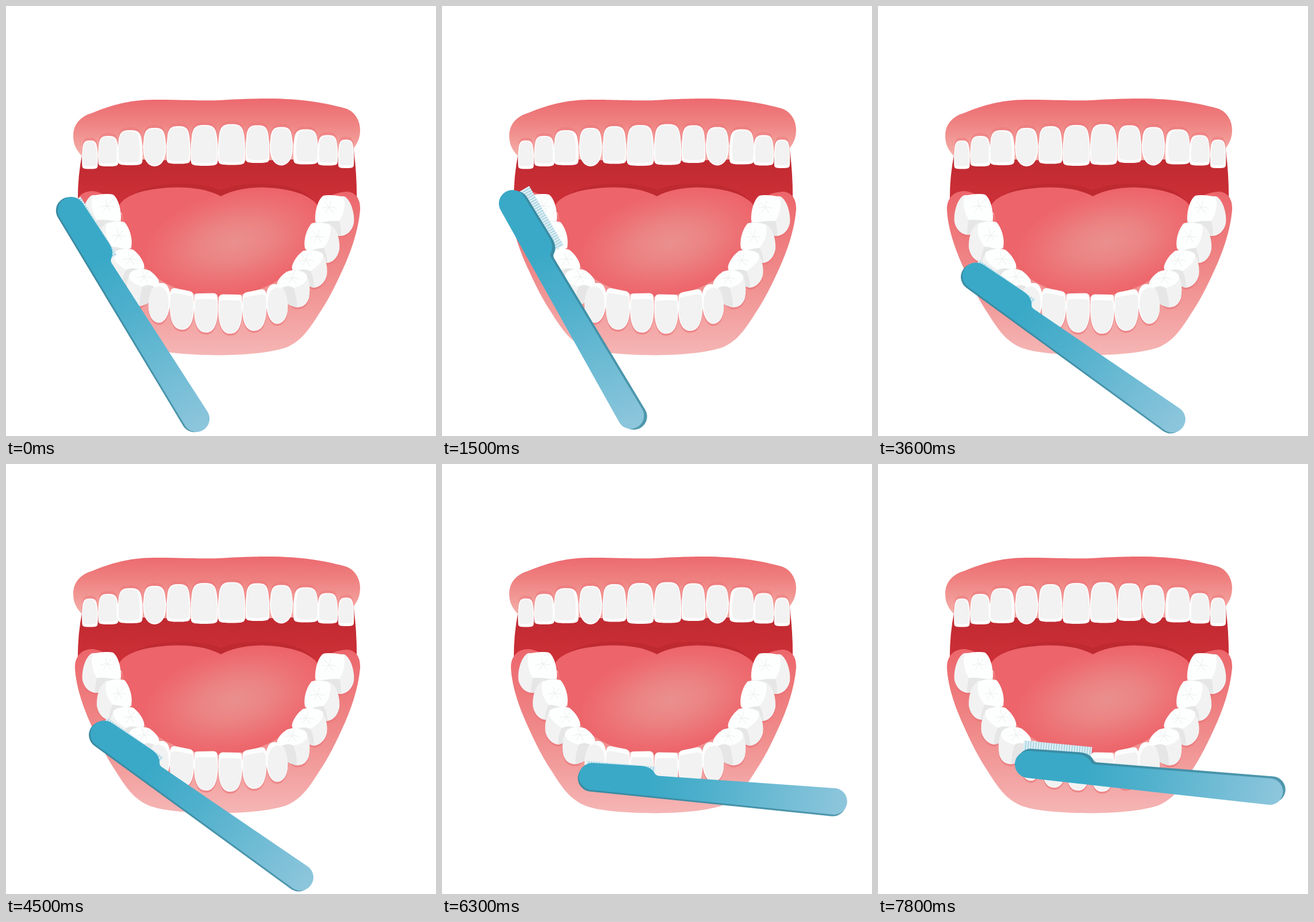
An HTML page that plays this animation: 748x748 px, repeating every 8100 ms.

```html
<!DOCTYPE html>
<html lang="en">
<head>
<meta charset="utf-8">
<title>Brushing teeth</title>
<style>
html, body { margin: 0; width: 100%; height: 100%; overflow: hidden; background: #fff; }
svg { display: block; width: 100vw; height: 100vh; }
.white { fill: #fdfefe; }
.body { fill: #f2f2f2; }
.shade { fill: #e6e6e6; }
.crack { fill: none; stroke: #edf0f0; stroke-width: 1.1; stroke-linecap: round; }
.halo { fill: #ea7277; opacity: .6; }
.soft { fill: #ea7277; opacity: .4; }
</style>
</head>
<body>
<svg viewBox="0 0 748 748">
  <defs>
    <linearGradient id="upperGum" gradientUnits="userSpaceOnUse" x1="0" y1="162" x2="0" y2="255">
      <stop offset="0" stop-color="#ec6a6f"/><stop offset=".45" stop-color="#ef8382"/><stop offset="1" stop-color="#f4aaa5"/>
    </linearGradient>
    <linearGradient id="lowerGum" gradientUnits="userSpaceOnUse" x1="0" y1="322" x2="0" y2="608">
      <stop offset="0" stop-color="#ec666b"/><stop offset=".5" stop-color="#f08a8a"/><stop offset="1" stop-color="#f5b6b5"/>
    </linearGradient>
    <linearGradient id="throat" gradientUnits="userSpaceOnUse" x1="0" y1="260" x2="0" y2="345">
      <stop offset="0" stop-color="#bf2930"/><stop offset="1" stop-color="#ce3038"/>
    </linearGradient>
    <radialGradient id="tongue" gradientUnits="userSpaceOnUse" cx="0" cy="0" r="1" gradientTransform="translate(398 411) rotate(-12) scale(165 90)">
      <stop offset="0" stop-color="#ea8f8e"/><stop offset=".35" stop-color="#eb8584"/><stop offset=".75" stop-color="#ed6f73"/><stop offset="1" stop-color="#ed646a"/>
    </radialGradient>
    <linearGradient id="face" gradientUnits="userSpaceOnUse" x1="100" y1="-10" x2="440" y2="20">
      <stop offset="0" stop-color="#3aa9c7"/><stop offset=".3" stop-color="#4fb0cc"/><stop offset="1" stop-color="#8dc6dc"/>
    </linearGradient>
    <linearGradient id="side" gradientUnits="userSpaceOnUse" x1="100" y1="0" x2="440" y2="0">
      <stop offset="0" stop-color="#3a8ca4"/><stop offset="1" stop-color="#4f98ae"/>
    </linearGradient>
    <path id="handle" d="M-1-23.500L83-25.500C96-25.500 103-21 107-15Q109.500-11.200 114-11L422-16A23 23 0 0 1 422 30L0 23.500A23.500 23.500 0 0 1-1-23.500Z"/>
    <clipPath id="inUpper"><use href="#upper"/></clipPath>
  </defs>

  <path fill="url(#throat)" d="M133 255Q124 298 125 345L215 362H540L610 345Q611 292 604 244Z"/>
  <path fill="#bf2a31" d="M207 336C237 315 265 309 310 309Q350 310 374 320Q400 309 440 309C485 309 515 317 535 338L374 350Z"/>
  <path id="upper" fill="url(#upperGum)" d="M133 262C122 251 117 240 117 226C117 205 130 192 150 186C185 172 215 163 260 163C310 163 330 165 370 164C420 161 440 161 465 161C520 162 560 170 590 178C607 183 616 200 616 215C616 230 611 240 604 248L603 262Q368 277 133 262Z"/>
  <path fill="url(#lowerGum)" d="M120 356C119 334 132 322 150 322C170 323 185 338 197 352L228 430Q290 495 370 500Q450 495 508 430L543 350C555 332 575 323 595 323C610 325 617 338 616 355C613 390 600 428 585 460C573 487 560 512 546 533C527 563 515 581 490 593C465 602 425 607 370 607.500C320 607 270 604 246 593C221 581 209 563 190 533C176 512 163 487 151 460C136 428 122 390 120 356Z"/>
  <path fill="url(#tongue)" d="M197 347C208 326 250 316 300 315.500C340 316 360 324 374 331C390 322 415 316 445 315.500C500 317 533 331 543 349L524 430Q470 502 370 506Q270 502 222 430Z"/>
  <g id="teeth"></g>

  <g id="brush">
    <path id="base" stroke="#a8d3e1"/>
    <path id="tufts" stroke="#e0f0f5" stroke-dasharray="2.6 1.900"/>
    <use id="edge" href="#handle" fill="url(#side)"/>
    <use href="#handle" fill="url(#face)"/>
  </g>
</svg>
<script>
const $ = id => document.getElementById(id);
const path = (cls, d) => `<path class="${cls}" d="${d}"/>`;
const mirror = (w, dy, art) => art + `<g transform="matrix(-1 0 0 1 ${w} ${dy})">${art}</g>`;

// Upper tooth: flat top with round shoulders, bottom corners of height b
function crown(x0, x1, y0, y1, b) {
  const w = x1 - x0, h = y1 - y0, m = (x0 + x1) / 2, i = w * .015, c = w * b * .012;
  const half = (x, s) => ({
    low: `${x + s * i} ${y1 - b}`,
    side: `${x - s * i} ${y0 + h * .55}`,
    shoulder: `${x + s * w * .04} ${y0 + h * .3}`,
    bend: `${x + s * w * .08} ${y0 + h * .02}`,
    top: `${x + s * w * .25} ${y0}`,
    corner: `${x + s * i} ${y1 - b * .1}`,
    foot: `${x + s * c} ${y1}`
  });
  const l = half(x0, 1), r = half(x1, -1);
  return `M${l.low}Q${l.side} ${l.shoulder}C${l.bend} ${l.top} ${m} ${y0}` +
    `C${r.top} ${r.bend} ${r.shoulder}Q${r.side} ${r.low}` +
    `C${r.corner} ${r.foot} ${m} ${y1}C${l.foot} ${l.corner} ${l.low}Z`;
}

// left, right, top, bottom, corner, white rim at the inner side
const uppers = [
  [132, 160, 234, 283.5, 7, 2], [160, 196, 226, 279, 8, 3], [194, 238, 216, 277, 9, 5],
  [238, 279, 212, 279, 32, 2], [279, 321, 209, 274.5, 8, 2], [321, 369, 207, 278, 9, 2]
];
const upperHalo = uppers.map(([l, r, t, b, c]) => path("soft", crown(l, r, t - 5, b - 8, c))).join("");
const upperTeeth = uppers.map(([l, r, t, b, c, rim]) =>
  path("white", crown(l, r, t, b, c)) +
  path("body", crown(l + 1.5, r - rim, t + 2, b - (c > 20 ? 2 : 5), c))).join("");

// body, biting face, shadow, centre of the fissures
const molars = [
  ["M150 329C137 335 131 362 133 376C136 390 146 398 157 398Q176 397 200 374L186 328Z",
   "M151 331C160 327 178 326 186 328C195 334 201 354 200 371Q197 375 188 374Q172 371 158 372C151 362 146 342 151 331Z",
   "M158 372Q178 370 199 374L180 389Q165 398 155 397Q155 383 158 372Z", 176, 348],
  ["M176 377C163 383 157 402 158 421C161 437 171 445 181 445Q200 438 218 420L205 376Z",
   "M175 379C184 374 198 374 206 376C215 385 221 406 218 419Q215 424 207 423Q195 419 186 419C175 408 171 389 175 379Z",
   "M186 418Q200 419 215 423L200 436Q190 446 179 445Q179 430 186 418Z", 196, 399],
  ["M190 427C181 437 178 454 180 467C184 481 194 488 204 488Q224 478 240 457L222 424Z",
   "M187 429C195 422 213 421 221 424C232 431 243 449 240 456Q235 459 226 457Q216 455 209 459C198 453 183 441 187 429Z",
   "M209 458Q222 454 239 457L226 473Q214 487 202 488Q202 471 209 458Z", 216, 440],
  ["M219 461C210 472 208 490 211 506C215 519 224 523 235 522Q255 512 268 484L250 460Z",
   "M215 466C222 456 240 456 249 460C259 466 269 477 266 486Q260 490 252 486Q244 484 238 488C226 486 210 477 215 466Z",
   "M238 487Q250 482 266 486L252 513Q244 521 232 522Q232 504 238 487Z", 240, 471]
];

// outline, enamel front
const fronts = [
  ["M268 482C282 479 287 495 286 515C284 538 276 551 266 551C253 550 247 535 248 518C249 500 256 485 268 482Z",
   "M254 492C268 483 278 490 282 505C286 530 276 551 266 551C253 550 247 535 248 518C249 506 251 498 254 492Z"],
  ["M285 501Q286 489 295 491L320 496Q327 498 326.500 506C329 543 323 563 306 563C288 562 283 541 285 501Z",
   "M286 504Q288 498 297 500L320 504Q325 505 325 510C327 543 322 562 306 562C289 561 284 541 286 504Z"],
  ["M327.500 506Q327 500 334 500L361 499.500Q368 500 368 507C371 548 364 568 348 568C331 568 325 548 327.500 506Z",
   "M329 515Q329 510 336 510L360 510Q366 510 366.500 515C369 548 363 567 348 567C332 567 327 548 329 515Z"]
];
const crack = (x, y) =>
  path("crack", `M${x - 12} ${y + 2}Q${x - 4} ${y - 2} ${x} ${y}L${x + 12} ${y + 1}M${x - 3} ${y - 11}L${x} ${y}L${x + 8} ${y - 9}M${x - 7} ${y + 10}L${x} ${y}L${x + 6} ${y + 9}`);
const lowerHalo = `<g transform="translate(0 3.5)">${[...molars, ...fronts].map(m => path("halo", m[0])).join("")}</g>`;
const lowerTeeth =
  molars.map(([d, top, dark, x, y]) => path("body", d) + path("shade", dark) + path("white", top) + crack(x, y)).join("") +
  fronts.map(([d, front]) => path("white", d) + path("body", front)).join("");

$("teeth").innerHTML =
  `<g clip-path="url(#inUpper)">${mirror(737.5, -1.5, upperHalo)}</g>` + mirror(737.5, -1.5, upperTeeth) +
  mirror(738, 2, lowerHalo) + mirror(738, 2, lowerTeeth);

// Head centre and angle at the start and end of a stroke
const spots = [
  [[114, 356, 58.1], [122.7, 344, 59.9]],
  [[171, 470, 35.2], [178.6, 459, 36.2]],
  [[262, 543.5, 4.95], [262, 522.5, 5.5]]
];
const STEP = 300, LOOP = 8100;
const mix = (a, b, k) => a + (b - a) * k;

function draw(now) {
  const n = Math.floor(now % LOOP / STEP), k = n % 3 / 2;
  const [from, to] = spots[Math.floor(n / 9)];
  const [x, y, turn] = from.map((v, i) => mix(v, to[i], k));
  $("brush").setAttribute("transform", `translate(${x} ${y}) rotate(${turn})`);
  $("edge").setAttribute("transform", `translate(${mix(-1.5, 4, k)} ${mix(3, -4, k)})`);
  const tip = mix(-26, -40.5, k), mid = (tip - 10) / 2;
  for (const id of ["base", "tufts"]) {
    $(id).setAttribute("d", `M-12 ${mid}H107`);
    $(id).setAttribute("stroke-width", -10 - tip);
  }
}
function tick(now) {
  draw(now);
  requestAnimationFrame(tick);
}
draw(0);
requestAnimationFrame(tick);
</script>
</body>
</html>
```
